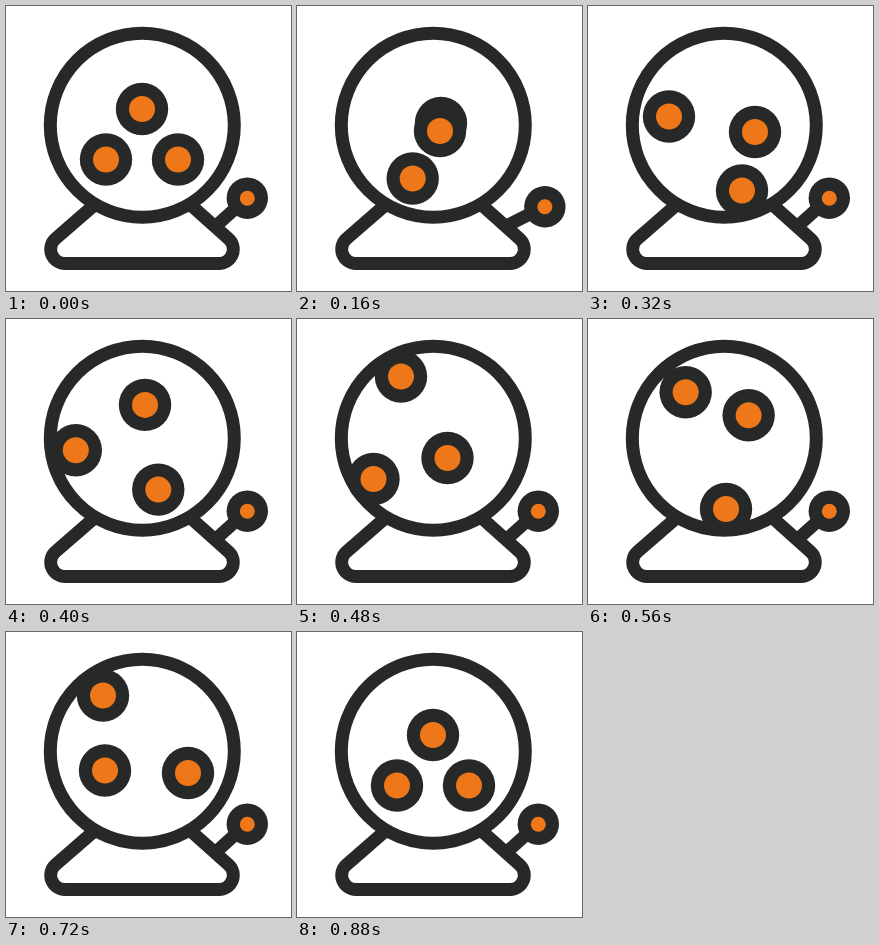
These frames come from a looping animation (285x285 px, 1.04 s). An HTML page:

```html
<!DOCTYPE html>
<html lang="en">
<head>
<meta charset="utf-8">
<title>Lottery machine</title>
<style>
  html, body { margin: 0; width: 100%; height: 100%; overflow: hidden; background: #fff; }
  svg { display: block; width: 100vw; height: 100vh; }
  .line { fill: none; stroke: #272928; stroke-width: 13; stroke-linecap: round; stroke-linejoin: round; }
  .dark { fill: #272928; }
  .core { fill: #ee7719; }
</style>
</head>
<body>
<svg viewBox="0 0 285 285">
  <defs>
    <g id="ball"><circle class="dark" r="26.2"/><circle class="core" r="13"/></g>
  </defs>
  <circle class="line" cx="136.3" cy="119.2" r="92"/>
  <path class="line" d="M86 201L49.6 232.6A14.2 14.2 0 0 0 59 257.5H213A14.2 14.2 0 0 0 222.4 232.6L187 201"/>
  <g id="lever">
    <path class="line" stroke-width="12" d="M211 219L241 192"/>
    <circle class="dark" cx="241.3" cy="192.2" r="20.7"/>
    <circle class="core" cx="241.3" cy="192.2" r="7.5"/>
  </g>
  <use id="right" href="#ball"/>
  <use id="left" href="#ball"/>
  <use id="top" href="#ball"/>
</svg>
<script>
  const STEP = 80, STEPS = 13;
  const el = id => document.getElementById(id);

  // Key points [step, x, y]; a smooth curve joins them.
  const keys = {
    top: [[0, 136, 103], [2, 143, 125], [4, 154, 184.5], [6, 150.5, 139],
          [8, 161, 57], [9, 97, 63.5], [11, 136, 103]],
    left: [[0, 100, 153.5], [2, 115.7, 172.5], [4, 167, 126], [6, 104, 57.5],
           [8, 99, 105], [9, 99, 138.5], [11, 100, 153.5]],
    right: [[0, 172, 153.5], [2, 144, 117], [4, 81, 110.5], [6, 76.5, 160],
            [7, 138, 190], [8, 200, 119], [9, 182, 141], [11, 172, 153.5]]
  };

  // Slope at key i along one axis; balls start and end at rest.
  const slope = (pts, i, axis) => {
    const a = pts[i - 1], b = pts[i + 1];
    return a && b ? (b[axis] - a[axis]) / (b[0] - a[0]) : 0;
  };

  function along(pts, t, axis) {
    const i = pts.findIndex(p => p[0] > t) - 1;
    if (i < 0) return pts.at(-1)[axis];
    const a = pts[i], b = pts[i + 1], span = b[0] - a[0];
    const u = (t - a[0]) / span, v = 1 - u;
    return a[axis] * v * v * (1 + 2 * u) + b[axis] * u * u * (1 + 2 * v)
      + span * u * v * (v * slope(pts, i, axis) - u * slope(pts, i + 1, axis));
  }

  // Snaps down at step 1, then eases back within two steps.
  const pull = t => t < 1 || t > 3 ? 0 : 60 * ((3 - t) / 2) ** 2;

  function draw(now) {
    const t = Math.floor(now / STEP) % STEPS;
    for (const id in keys) {
      const [x, y] = [1, 2].map(axis => along(keys[id], t, axis));
      el(id).setAttribute('transform', `translate(${x} ${y})`);
    }
    el('lever').setAttribute('transform', `rotate(${pull(t)} 212 221.5)`);
  }

  let start;
  function tick(now) {
    start ??= now;
    draw(now - start);
    requestAnimationFrame(tick);
  }
  draw(0);
  requestAnimationFrame(tick);
</script>
</body>
</html>
```
